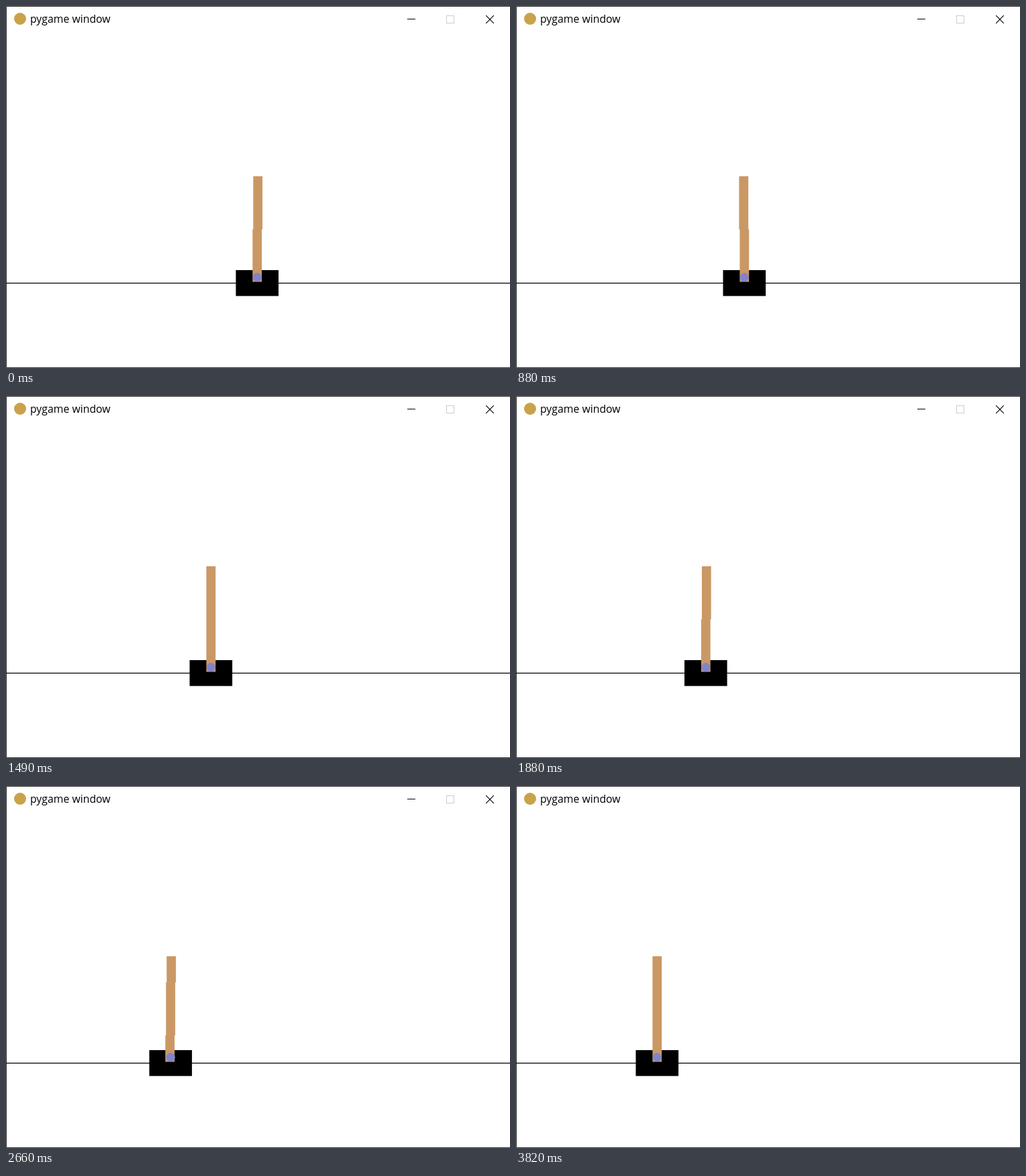
These frames come from a looping animation (751 by 540 pixels, 3.91 s). An HTML page:

```html
<!DOCTYPE html>
<html lang="en">
<head>
<meta charset="utf-8">
<title>Cart and pole</title>
<style>
  html, body { margin: 0; width: 100%; height: 100%; overflow: hidden; background: #fff; }
  svg { display: block; }
  text { font: 15.8px "Open Sans", "Noto Sans", sans-serif; }
</style>
</head>
<body>
<svg width="751" height="540" viewBox="0 0 751 540">
  <rect width="751" height="540" fill="#fff"/>
  <path d="M751 .5H.5V539.5H751" fill="none" stroke="#2b2b2b"/>

  <circle cx="21" cy="19" r="9" fill="#c9a24a"/>
  <text x="36" y="25">pygame window</text>
  <g id="buttons" fill="none" stroke="#000">
    <path d="M598 19.5H610"/>
    <rect x="656.5" y="14.5" width="11" height="11" stroke="#ccc"/>
    <path d="M715.2 14.2L726.8 25.8M726.8 14.2L715.2 25.8" stroke-width="1.2"/>
  </g>

  <rect y="412.8" width="751" height="1.25"/>
  <g id="cart">
    <rect x="-31.8" y="394" width="63.6" height="38.6"/>
    <path id="pole" fill="#ca9865"/>
    <circle cy="404.6" r="6.6" fill="#8184cb"/>
  </g>
</svg>
<script>
  const LOOP = 3910;
  const FIRST_HOLD = 90;
  const STEP = 77.7;
  const LAST_STEP = 49;
  const POLE = { top: 254, bottom: 411.5, half: 6.9 };

  // Key poses; the cart glides and the pole sways between them.
  const POSES = [
    { step: 0, x: 374.3, lean: 1 },
    { step: 2, x: 381.6, lean: 1 },
    { step: 11, x: 340.3, lean: -1 },
    { step: 19, x: 305.4, lean: 0 },
    { step: 24, x: 282.8, lean: 1 },
    { step: 34, x: 245.3, lean: 2 },
    { step: 41, x: 226.6, lean: -1 },
    { step: LAST_STEP, x: 210.3, lean: 0 },
  ];

  const cart = document.getElementById('cart');
  const pole = document.getElementById('pole');
  const buttons = document.getElementById('buttons');

  function poseAt(step) {
    const i = Math.max(1, POSES.findIndex(p => p.step >= step));
    const a = POSES[i - 1], b = POSES[i];
    const f = (step - a.step) / (b.step - a.step);
    const mix = key => a[key] + (b[key] - a[key]) * f;
    return { x: mix('x'), lean: Math.round(mix('lean')) };
  }

  // A leaning pole is a stack of upright pieces, each shifted by one pixel.
  function polePath(lean) {
    const { top, bottom, half } = POLE;
    const n = Math.abs(lean), dir = Math.sign(lean);
    const base = -Math.trunc(lean / 2);
    const edge = i => i <= 0 ? bottom : i > n ? top
      : Math.round(bottom - (bottom - top) * (i - 0.5) / n);
    let d = '';
    for (let i = 0; i <= n; i++)
      d += `M${base + i * dir - half} ${edge(i)}h${2 * half}V${edge(i + 1)}h${-2 * half}z`;
    return d;
  }

  function draw(now) {
    const t = now % LOOP;
    const step = t < FIRST_HOLD ? 0
      : Math.min(LAST_STEP, 1 + Math.floor((t - FIRST_HOLD) / STEP));
    const { x, lean } = poseAt(step);
    cart.setAttribute('transform', `translate(${x} 0)`);
    pole.setAttribute('d', polePath(lean));
    buttons.setAttribute('visibility', step === LAST_STEP ? 'hidden' : 'visible');
  }

  const start = performance.now();
  function tick() {
    draw(performance.now() - start);
    requestAnimationFrame(tick);
  }
  tick();
</script>
</body>
</html>
```
